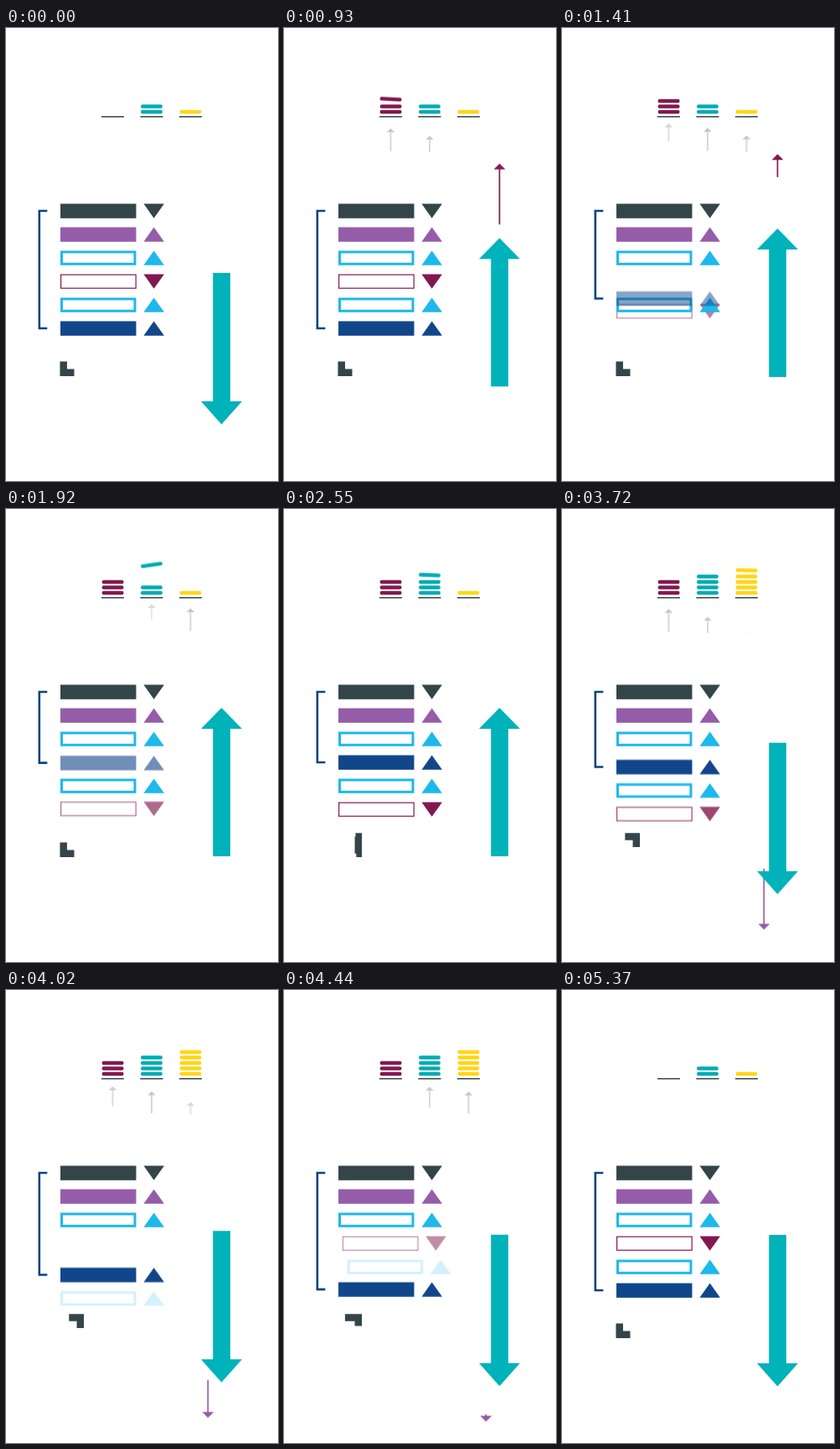
An HTML page without scripts for the animation above (5.4 s loop, 325 by 540 pixels).

```html
<!DOCTYPE html>
<html lang="en">
<head>
<meta charset="utf-8">
<title>Sorting loop</title>
<style>
html, body { margin: 0; width: 100%; height: 100%; overflow: hidden; background: #fff; }
svg { display: block; width: 325px; height: 540px; }

:root {
  --dark: #34454a; --teal: #00b2b9; --violet: #955da9; --sky: #1eb8ea;
  --wine: #831850; --navy: #11478a; --gold: #ffd616;
  --ease: cubic-bezier(.3, 0, .26, 1);
}
.dark { fill: var(--dark); } .teal { fill: #00acb4; } .violet { fill: var(--violet); }
.sky { fill: var(--sky); } .wine { fill: var(--wine); } .navy { fill: var(--navy); }
.gold { fill: var(--gold); }
.box { fill: none; }
.sky .box { stroke: var(--sky); stroke-width: 3; }
.wine .box { stroke: var(--wine); stroke-width: 1.2; }

/* every animation shares one 5.4s loop */
.a { animation: 5.4s linear infinite; }

/* coins */
.coin {
  transform-box: fill-box; transform-origin: center;
  animation-delay: calc(var(--s) - 5.4s), 0s;
}
@keyframes fall {
  0% { transform: translateY(calc(var(--d) * -1)) rotate(-10deg); }
  2.5% { transform: translateY(calc(var(--d) * -.68)) rotate(-8deg); }
  6.1% { transform: translateY(calc(var(--d) * -.1)) rotate(3deg); }
  9%, 100% { transform: none; }
}
@keyframes w1 { 0%, 2.2% { opacity: 0 } 3.7%, 96.3% { opacity: 1 } 98.7%, 100% { opacity: 0 } }
@keyframes w2 { 0%, 6.7% { opacity: 0 } 8.2%, 93.9% { opacity: 1 } 96.3%, 100% { opacity: 0 } }
@keyframes w3 { 0%, 11.1% { opacity: 0 } 12.6%, 91.5% { opacity: 1 } 93.9%, 100% { opacity: 0 } }
@keyframes t3 { 0%, 33.3% { opacity: 0 } 34.8%, 91.5% { opacity: 1 } 93.9%, 100% { opacity: 0 } }
@keyframes t4 { 0%, 40.6% { opacity: 0 } 42.1%, 89.1% { opacity: 1 } 91.5%, 100% { opacity: 0 } }
@keyframes g2 { 0%, 53% { opacity: 0 } 54.5%, 93.9% { opacity: 1 } 96.3%, 100% { opacity: 0 } }
@keyframes g3 { 0%, 55.7% { opacity: 0 } 57.2%, 91.5% { opacity: 1 } 93.9%, 100% { opacity: 0 } }
@keyframes g4 { 0%, 58.5% { opacity: 0 } 60%, 89.1% { opacity: 1 } 91.5%, 100% { opacity: 0 } }
@keyframes g5 { 0%, 61.1% { opacity: 0 } 62.6%, 86.7% { opacity: 1 } 89.1%, 100% { opacity: 0 } }

/* small grey arrows */
.hint {
  fill: #c6c7ca; stroke: #c6c7ca; stroke-width: 1.4;
  animation-name: rise; animation-delay: calc(var(--s) - 5.4s);
}
@keyframes rise {
  0% { d: path("M0 150V147M-3 149L0 146L3 149Z"); opacity: 0; }
  8.3% { d: path("M0 148V131M-3 133.5L0 130.5L3 133.5Z"); opacity: .95; }
  12.8% { d: path("M0 147V123M-3 125.5L0 122.5L3 125.5Z"); opacity: 1; }
  17.2% { d: path("M0 147V121M-3 123.5L0 120.5L3 123.5Z"); opacity: 1; }
  21.7% { d: path("M0 141V117M-3 119.5L0 116.5L3 119.5Z"); opacity: .95; }
  26.7% { d: path("M0 134V115M-3 117.5L0 114.5L3 117.5Z"); opacity: .7; }
  29.4% { d: path("M0 124V114M-3 116.5L0 113.5L3 116.5Z"); opacity: .25; }
  31.1%, 100% { d: path("M0 117V113M-3 115.5L0 112.5L3 115.5Z"); opacity: 0; }
}

/* large arrow with its two trails */
.lift { animation-name: lift; animation-timing-function: var(--ease); }
@keyframes lift {
  0%, 1.67% { transform: none; }
  33.33%, 53.33% { transform: translateY(-55px); }
  85%, 100% { transform: none; }
}
.big { fill: var(--teal); animation-name: turn; animation-timing-function: ease-in-out; }
@keyframes turn {
  0%, 1.67%, 58.9%, 100% {
    d: path("M257.5 292L268 292L268 292L268 445L282 445L257.5 472.5L233 445L247.3 445L247.3 292L247.3 292Z");
  }
  7.2%, 53.33% {
    d: path("M257.5 292L282 317L268 317L268 469L268 469L257.5 469L247.3 469L247.3 469L247.3 317L233 317Z");
  }
}
.trail { stroke-width: 1.7; }
.up { fill: var(--wine); stroke: var(--wine); animation-name: up; }
.down { fill: var(--violet); stroke: var(--violet); animation-name: down; }
@keyframes up {
  0%, 2.2% { d: path("M257.5 302V296M252.5 299L257.5 294L262.5 299Z"); opacity: 0; }
  3% { opacity: 1; }
  10%, 17.2% { d: path("M257.5 276V207M252.5 209.5L257.5 204.5L262.5 209.5Z"); }
  30%, 32.2% { d: path("M257.5 211V207M252.5 209.5L257.5 204.5L262.5 209.5Z"); opacity: 1; }
  35%, 100% { d: path("M257.5 211V207M252.5 209.5L257.5 204.5L262.5 209.5Z"); opacity: 0; }
}
@keyframes down {
  0%, 54% { d: path("M241.3 436V440M236.3 438L241.3 443L246.3 438Z"); opacity: 0; }
  55.5% { opacity: 1; }
  62.2%, 68.9% { d: path("M241.3 442V511M236.3 508.5L241.3 513.5L246.3 508.5Z"); }
  81.7%, 84.4% { d: path("M241.3 506V511M236.3 508.5L241.3 513.5L246.3 508.5Z"); opacity: 1; }
  87%, 100% { d: path("M241.3 506V511M236.3 508.5L241.3 513.5L246.3 508.5Z"); opacity: 0; }
}

/* rows and bracket */
.bracket {
  fill: none; stroke: #0f4380; stroke-width: 2.6;
  animation-name: bracket; animation-timing-function: var(--ease);
}
@keyframes bracket {
  0%, 17.8%, 85.6%, 100% { d: path("M49.3 218H39.8V358H49.3"); }
  38.3%, 66.1% { d: path("M49.3 218H39.8V302H49.3"); }
}
.first { animation-name: climb, dim; animation-timing-function: var(--ease), linear; }
.last { animation-name: drop, leave; animation-timing-function: var(--ease), linear; }
.mid { animation-name: push, fade; animation-timing-function: var(--ease), linear; }
@keyframes climb {
  0%, 17.8%, 85.6%, 100% { transform: none; }
  38.3%, 66.1% { transform: translateY(-56px); }
}
@keyframes dim {
  0%, 17.8%, 40%, 100% { opacity: 1; }
  23.3%, 34.4% { opacity: .5; }
}
@keyframes drop {
  0%, 17.8% { transform: none; }
  38.3%, 66.1% { transform: translateY(56px); }
  85.6%, 100% { transform: translateY(112px); }
}
@keyframes leave {
  0%, 17.8%, 40%, 67.8% { opacity: 1; }
  23.3%, 34.4% { opacity: .55; }
  73.3%, 100% { opacity: 0; }
}
@keyframes push {
  0%, 66.1% { transform: none; }
  85.6%, 100% { transform: translateY(56px); }
}
@keyframes fade {
  0%, 70% { opacity: 1; }
  75.6%, 100% { opacity: 0; }
}
.in3 { animation-name: slide3, show3; }
.in4 { animation-name: slide4, show4; }
.in3, .in4 { animation-timing-function: cubic-bezier(.33, .5, .67, 1), linear; }
@keyframes slide3 { 0%, 78.1% { transform: translateX(15px) } 86.4%, 100% { transform: none } }
@keyframes show3 { 0%, 78.1% { opacity: 0 } 86.4%, 100% { opacity: 1 } }
@keyframes slide4 { 0%, 80.6% { transform: translateX(15px) } 88.9%, 100% { transform: none } }
@keyframes show4 { 0%, 80.6% { opacity: 0 } 88.9%, 100% { opacity: 1 } }

/* block crawling round a small square */
.crawl {
  fill: none; stroke: var(--dark); stroke-width: 8.5; stroke-dasharray: 26 200;
  animation-name: crawl; animation-timing-function: var(--ease);
}
@keyframes crawl {
  0%, 37.2% { stroke-dashoffset: -7px; }
  57.8%, 80% { stroke-dashoffset: -48px; }
  99.4%, 100% { stroke-dashoffset: -87.6px; }
}
</style>
</head>
<body>
<svg viewBox="0 0 325 540" xmlns="http://www.w3.org/2000/svg">
  <defs>
    <rect id="bar" x="65" width="90.5" height="17.3"/>
    <path id="tri" d="M164.5 17.3L176.7 0L189 17.3Z"/>
    <path id="tip" d="M164.5 0L176.7 17.3L189 0Z"/>
    <g id="sky" class="sky"><rect class="box" x="66.5" y="1.5" width="87.5" height="14.3"/><use href="#tri"/></g>
    <g id="wine" class="wine"><rect class="box" x="65.6" y=".6" width="89.6" height="16.1"/><use href="#tip"/></g>
  </defs>

  <path d="M114 105.8H141M160.4 105.8H187.6M207 105.8H234" stroke="#34454a" stroke-width="1.5"/>

  <g class="wine">
    <rect class="a coin" x="114.6" y="97.8" width="26" height="4.4" rx="2.2" style="--s:.12s;--d:35px;animation-name:fall,w1"/>
    <rect class="a coin" x="114.6" y="91.3" width="26" height="4.4" rx="2.2" style="--s:.36s;--d:28.5px;animation-name:fall,w2"/>
    <rect class="a coin" x="114.6" y="84.8" width="26" height="4.4" rx="2.2" style="--s:.6s;--d:22px;animation-name:fall,w3"/>
  </g>
  <g class="teal">
    <rect x="161" y="97.8" width="26" height="4.4" rx="2.2"/>
    <rect x="161" y="91.3" width="26" height="4.4" rx="2.2"/>
    <rect class="a coin" x="161" y="84.8" width="26" height="4.4" rx="2.2" style="--s:1.8s;--d:28.5px;animation-name:fall,t3"/>
    <rect class="a coin" x="161" y="78.3" width="26" height="4.4" rx="2.2" style="--s:2.19s;--d:22px;animation-name:fall,t4"/>
  </g>
  <g class="gold">
    <rect x="207.5" y="97.8" width="26" height="4.4" rx="2.2"/>
    <rect class="a coin" x="207.5" y="91.3" width="26" height="4.4" rx="2.2" style="--s:2.86s;--d:41.5px;animation-name:fall,g2"/>
    <rect class="a coin" x="207.5" y="84.8" width="26" height="4.4" rx="2.2" style="--s:3.01s;--d:35px;animation-name:fall,g3"/>
    <rect class="a coin" x="207.5" y="78.3" width="26" height="4.4" rx="2.2" style="--s:3.16s;--d:28.5px;animation-name:fall,g4"/>
    <rect class="a coin" x="207.5" y="71.8" width="26" height="4.4" rx="2.2" style="--s:3.3s;--d:22px;animation-name:fall,g5"/>
  </g>

  <g transform="translate(127.4)">
    <path class="a hint" style="--s:0s"/><path class="a hint" style="--s:2.76s"/>
  </g>
  <g transform="translate(174)">
    <path class="a hint" style="--s:.45s"/><path class="a hint" style="--s:3.24s"/>
  </g>
  <g transform="translate(220.5)">
    <path class="a hint" style="--s:.92s"/><path class="a hint" style="--s:3.69s"/>
  </g>

  <path class="a bracket"/>
  <g transform="translate(0 209.5)" class="dark"><use href="#bar"/><use href="#tip"/></g>
  <g transform="translate(0 237.5)" class="violet"><use href="#bar"/><use href="#tri"/></g>
  <use href="#sky" y="265.5"/>
  <g class="a last"><use href="#wine" y="293.5"/></g>
  <g class="a mid"><use href="#sky" y="321.5"/></g>
  <g class="a in3"><use href="#wine" y="293.5"/></g>
  <g class="a in4"><use href="#sky" y="321.5"/></g>
  <g class="a first"><g transform="translate(0 349.5)" class="navy"><use href="#bar"/><use href="#tri"/></g></g>

  <path class="a crawl" d="M68.7 390.5V410.7H88.8V390.5H68.7V410.7H88.8"/>

  <g class="a lift">
    <path class="a trail up"/>
    <path class="a trail down"/>
    <path class="a big"/>
  </g>
</svg>
</body>
</html>
```
